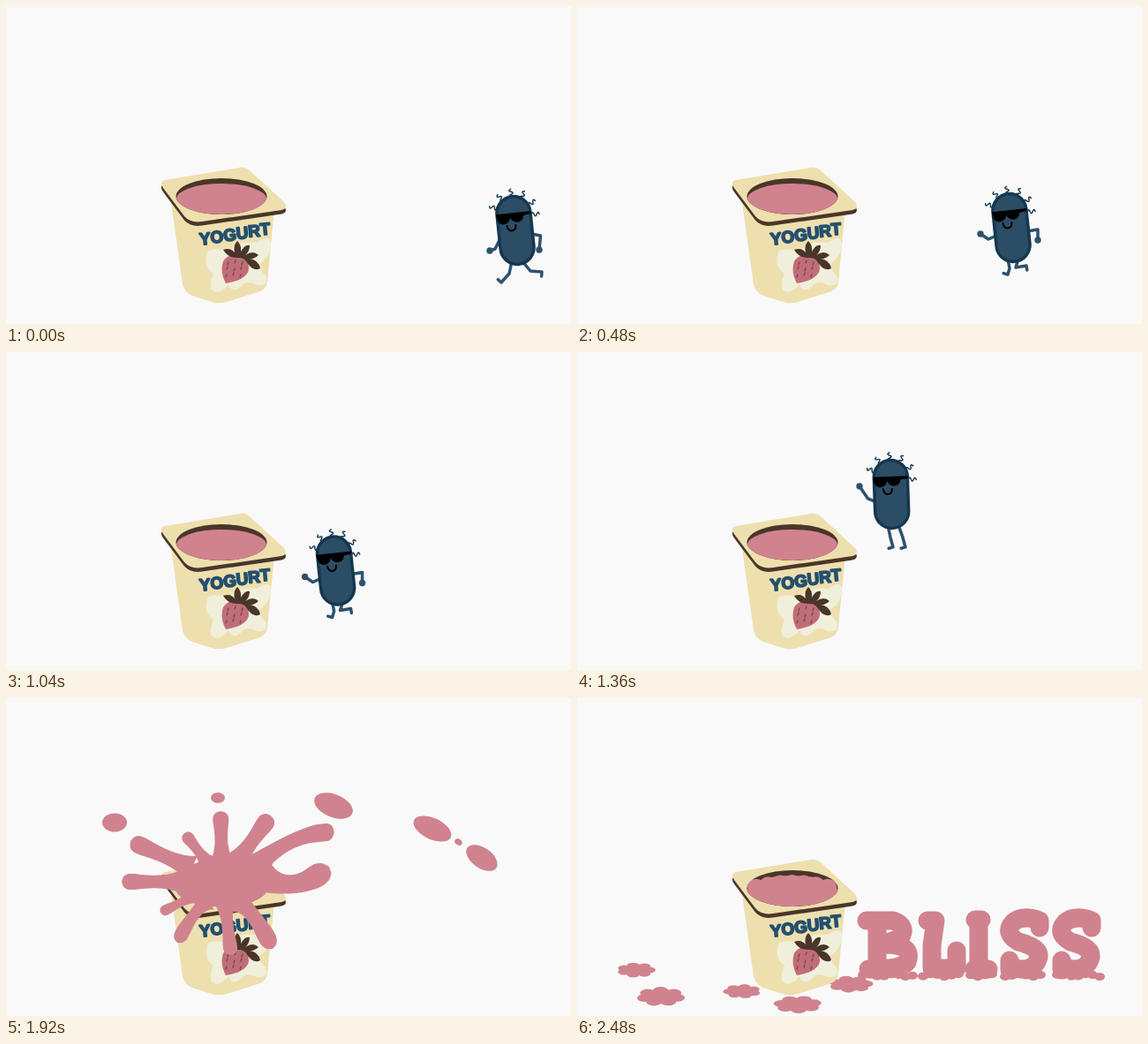
An HTML page that plays this animation: 640 px wide and 360 px high, repeating every 2.56 s.

```html
<!DOCTYPE html>
<html lang="en">
<head>
<meta charset="utf-8">
<title>Yogurt bliss</title>
<style>
  html, body { margin: 0; width: 100%; height: 100%; overflow: hidden; background: #f9f9f9; }
  svg { display: block; width: 640px; height: 360px; }
  .cream { fill: #eedfae; }
  .dark { fill: #4a3629; }
  .pink { fill: #d0838e; }
  .line { fill: none; stroke-linecap: round; stroke-linejoin: round; }
  #label { font: bold 19px "Liberation Sans", Arial, sans-serif; fill: #24506f; stroke: #24506f; stroke-width: 1.8; stroke-linejoin: round; }
</style>
</head>
<body>
<svg viewBox="0 0 640 360">
  <defs>
    <path id="rim" d="M180,197L262,183.500Q271,181 277,187L315,222Q320,229 312,231L222,244Q209,246 202,238L178,206Q173,199 180,197Z"/>
    <clipPath id="bowl"><ellipse cx="244" cy="215.500" rx="51.500" ry="20.500"/></clipPath>
    <clipPath id="surface"><path d="M0,0H640V217H295A51,19 0 0 1 193,217H0Z"/></clipPath>
    <path id="s" d="M524,260V252Q505,245 494,254Q483,266 500,276Q524,282 523,293Q520,307 503,307Q492,306 490,297V308"/>
  </defs>

  <g id="puddles" class="pink"></g>

  <g id="cup">
    <path class="cream" d="M187,222L200,315Q202,324 211,328L233,335Q242,338 253,334L288,323Q295,320 296,312L304,230Z"/>
    <path fill="#f0efdc" d="M229,277Q240,273 252,278Q262,265 284,268Q300,257 300,270Q299,284 288,291Q286,298 294,305Q298,318 284,316Q272,309 266,318Q256,326 252,315Q246,323 238,324Q227,322 235,303Q222,294 229,277Z"/>
    <path fill="#c06d7a" d="M246,289Q251,281 262,282Q275,284 275,298Q273,310 249,314Q242,301 246,289Z"/>
    <path class="dark" d="M263,285Q252,286 246,276Q254,273 259,279Q257,271 262,266Q267,271 266,278Q271,269 276,271Q276,278 271,282Q280,276 286,282Q281,287 275,286Q286,287 288,297Q281,301 274,292Q270,284 263,285Z"/>
    <g id="seeds" class="line" stroke="#7b4348" stroke-width="1.300"></g>
    <text id="label" transform="translate(219.500 270.500) rotate(-9)" rotate="4">YOGURT</text>
    <use href="#rim" class="dark" y="4.500"/>
    <use href="#rim" class="cream"/>
    <ellipse class="dark" cx="244" cy="215.500" rx="51.500" ry="20.500"/>
    <g clip-path="url(#bowl)" class="pink">
      <ellipse cx="244" cy="218.500" rx="51" ry="17.500"/>
      <g id="lumps"></g>
    </g>
  </g>

  <g id="letters" class="pink">
    <g class="line" stroke="#d0838e" stroke-width="21" role="img" aria-label="BLISS">
      <path d="M328,252H358Q375,258 366,272L346,279Q382,278 374,299Q368,307 330,307M340,252V307"/>
      <path d="M397,252H406L402,280V306H430V286"/>
      <path d="M451,251H458M455,251V307M450,307H466"/>
      <use href="#s"/>
      <use href="#s" x="59"/>
    </g>
  </g>

  <g id="splash" class="pink"><ellipse cx="245" cy="209" rx="53" ry="27"/></g>
  <g id="drops" class="pink"></g>

  <g id="diver">
    <g id="hero">
      <path id="limbs" class="line" stroke="#2d526d" stroke-width="3.500"/>
      <g id="hands" fill="#2d526d"><circle r="3.700"/><circle r="3.700"/></g>
      <g id="body">
        <g id="hair" class="line" stroke="#15384f" stroke-width="1.500"></g>
        <rect x="-19" y="-38.500" width="38" height="77" rx="19" fill="#2c4d66" stroke="#15384f" stroke-width="3.500"/>
        <path d="M-20,-20H20L19,-17L11,-16Q10,-9 3,-9Q-3,-10 -4,-15Q-6,-8 -13,-8Q-20,-9 -20,-20Z"/>
        <path class="line" stroke="#000" stroke-width="2" d="M-9,-6Q-8,0 -4,0Q1,0 1,-6"/>
      </g>
    </g>
  </g>
</svg>

<script>
const LOOP = 2560, STEP = 80, LEAP = 1310, SPLASH = 1760;
const $ = id => document.getElementById(id);
const set = (el, attrs) => { for (const k in attrs) el.setAttribute(k, attrs[k]); return el; };
const add = (parent, tag, attrs) =>
  set(parent.appendChild(document.createElementNS('http://www.w3.org/2000/svg', tag)), attrs);
const show = (el, on) => { el.style.display = on ? '' : 'none'; };
const mix = (a, b, u) => a + (b - a) * u;
const clamp = v => Math.max(0, Math.min(1, v));
const scaleAt = (x, y, sx, sy = sx) => `translate(${x} ${y}) scale(${sx} ${sy}) translate(${-x} ${-y})`;

// time, x
const PATH = [[0, 577], [480, 492], [800, 414], [1000, 374], [1280, 371], [1360, 356], [1760, 209]];
// tip x, tip y, half width, bend
const ARMS = [
  [131, 208, 9, 0], [141, 162, 10, 0], [202, 153, 7, 0], [243, 128, 9, 0], [300, 133, 10, 0], [372, 152, 10, -22],
  [366, 191, 13, 28], [302, 284, 10, -16], [255, 291, 8, 0], [194, 277, 8, -12], [175, 243, 6, 0]
];
// x, y, rx, ry, tilt
const DROPS = [
  [123, 141, 14, 10.5, 0], [240, 113, 8, 6, 0], [371, 122, 23, 13, 22],
  [483, 148, 23, 12, 25], [512.5, 163, 4.5, 3.5, 35], [539, 181, 20, 11.5, 35]
];
// x, y, width, height
const PUDDLES = [[67, 308, 44, 17], [95, 338, 55, 22], [187, 332, 43, 16], [250, 347, 55, 20], [310, 324, 51, 19]];

// A tentacle: flared root, thin neck, round bulb
function arm([tx, ty, width, bend]) {
  const dx = (tx - 245) / 46, dy = (ty - 208) / 23, d = Math.hypot(dx, dy);
  const ox = 245 + 46 * dx / d, oy = 208 + 23 * dy / d;
  const length = Math.hypot(tx - ox, ty - oy), cap = width / length;
  const left = [], right = [];
  for (let i = 0; i <= 40; i++) {
    const s = i / 40, curve = 4 * bend * s * (1 - s) / 2;
    const nx = -(ty - oy + 2 * bend * (1 - 2 * s)), ny = tx - ox, n = Math.hypot(nx, ny);
    const end = clamp((s - 1 + cap) / cap);
    const r = width * (.6 + .4 * Math.min(1, s * s * 1.6) + .9 * (1 - s) ** 4) * Math.sqrt(1 - end * end);
    const x = mix(ox, tx, s), y = mix(oy, ty, s) + curve;
    left.push([x + nx / n * r, y + ny / n * r]);
    right.unshift([x - nx / n * r, y - ny / n * r]);
  }
  return 'M' + [...left, ...right].map(p => p.map(v => v.toFixed(1))).join('L') + 'Z';
}

function puddle([, , w, h], seed) {
  const g = add($('puddles'), 'g', {});
  add(g, 'ellipse', { rx: w * .36, ry: h * .38 });
  for (let i = 0; i < 7; i++) {
    const a = i * Math.PI * 2 / 7 + seed * 2;
    add(g, 'ellipse', { cx: w * .34 * Math.cos(a), cy: h * .3 * Math.sin(a), rx: w * .16, ry: h * .2 });
  }
  return g;
}

for (let a = -155; a < 10; a += 32)
  add($('hair'), 'path', { d: 'M20,0q1.500,-4 3,0t3,0t3,0', transform: `translate(0 -18) rotate(${a})` });
for (let i = 0; i < 9; i++)
  add($('seeds'), 'path', { d: `M${252 + i % 3 * 8 - (i / 3 | 0)},${290 + (i / 3 | 0) * 7 - i % 2 * 2}l-1,3` });
for (let i = 0; i < 7; i++)
  add($('lumps'), 'ellipse', { cx: 203 + 13.5 * i, cy: 215 - 6 * Math.sin((i + .5) * Math.PI / 7), rx: 10, ry: 9 });
for (const [from, to] of [[324, 382], [392, 434], [446, 471], [485, 531], [544, 594]])
  for (let x = from; x <= to; x += 8)
    add($('letters'), 'ellipse', { cx: x, cy: 314 + 1.5 * Math.sin(x), rx: 6, ry: 4.5 });
ARMS.forEach(a => add($('splash'), 'path', { d: arm(a) }));
const puddles = PUDDLES.map(puddle);
const drops = DROPS.map(([, , rx, ry]) => add($('drops'), 'ellipse', { rx, ry }));

function pose(t) {
  if (t > LEAP) {
    const u = (t - 1360) / 240, sway = -21 * u;
    return {
      y: 47.5 + 36 * ((t - 1502) / STEP) ** 2, tilt: mix(-2, 3, u), elbow: [0, 5],
      hands: [[mix(-36, -26, u), mix(-9, -18, u)], [mix(15, 28, u), mix(12, -13, u)]],
      knees: [[-1 + sway / 2, 49], [13 + sway / 2, 49]], ankles: [[2 + sway, 60], [16 + sway, 60]]
    };
  }
  const k = t < 1000 ? Math.abs(Math.cos(Math.PI * t / 192)) : 0;
  return {
    y: 254 - t / 160, tilt: -6, elbow: [6, -7],
    hands: [[-35 + 6 * k, 7 + 16 * k], [30 - 3 * k, 14 + 8 * k]],
    knees: [[-2 - 5 * k, 46 + 3 * k], [5 + 12 * k, 45 + k]],
    ankles: [[-4 - 12 * k, 53 + 6 * k], [17 + 13 * k, 43 + 4 * k]]
  };
}

function drawHero(t) {
  show($('diver'), t < SPLASH);
  if (t >= SPLASH) return;
  const i = PATH.findIndex((p, n) => t < PATH[n + 1][0]);
  const [[t0, x0], [t1, x1]] = PATH.slice(i, i + 2);
  const p = pose(t);
  const limb = (x, y, hand, [ex, ey]) => `M${x},${y}L${(x + hand[0]) / 2 + ex},${(y + hand[1]) / 2 + ey}L${hand}`;
  const leg = (hip, n) => {
    const [kx, ky] = p.knees[n], [ax, ay] = p.ankles[n];
    const dx = ax - kx, dy = ay - ky, k = 5 / Math.hypot(dx, dy);
    return `M${hip}L${kx},${ky}L${ax},${ay}l${-dy * k},${dx * k}`;
  };
  set($('hero'), { transform: `translate(${mix(x0, x1, (t - t0) / (t1 - t0))} ${p.y})` });
  set($('body'), { transform: `rotate(${p.tilt})` });
  set($('limbs'), { d: limb(-17, 9, p.hands[0], [0, 5]) + limb(18, 4, p.hands[1], p.elbow) + leg('-4,35', 0) + leg('8,35', 1) });
  p.hands.forEach(([cx, cy], n) => set($('hands').children[n], { cx, cy }));
  set($('diver'), { 'clip-path': t > 1600 ? 'url(#surface)' : 'none' });
}

function drawYogurt(t) {
  const n = (t - SPLASH) / STEP;
  const size = n >= 0 && n < 5 ? Math.sin(Math.PI * (n + 1) / 6) : 0;
  show($('splash'), size);
  set($('splash'), { transform: scaleAt(244, 215, size) });
  show($('lumps'), n >= 3);

  const out = clamp(n / 2), fall = clamp((n - 2) / 3);
  show($('drops'), n >= 0 && n < 5);
  DROPS.forEach(([x, y, , , tilt], i) => set(drops[i], {
    transform: `translate(${mix(244, x, out + .1 * fall)} ${mix(mix(205, y, out), 295, fall * fall)}) rotate(${tilt})`
  }));

  const spread = clamp((n - 3) / 3);
  show($('puddles'), spread);
  PUDDLES.forEach(([x, y], i) => set(puddles[i], { transform: `translate(${x} ${y}) scale(${spread})` }));

  const m = n - 5;
  show($('letters'), m >= 0);
  set($('letters'), { transform: scaleAt(458, 317, 1, 1 - .45 * Math.cos(2 * m) * Math.exp(-1.5 * m)) });
}

let start;
function frame(now) {
  start ??= now;
  const t = Math.floor((now - start) % LOOP / STEP) * STEP;
  drawHero(t);
  drawYogurt(t);
  requestAnimationFrame(frame);
}
drawHero(0);
drawYogurt(0);
requestAnimationFrame(frame);
</script>
</body>
</html>
```
